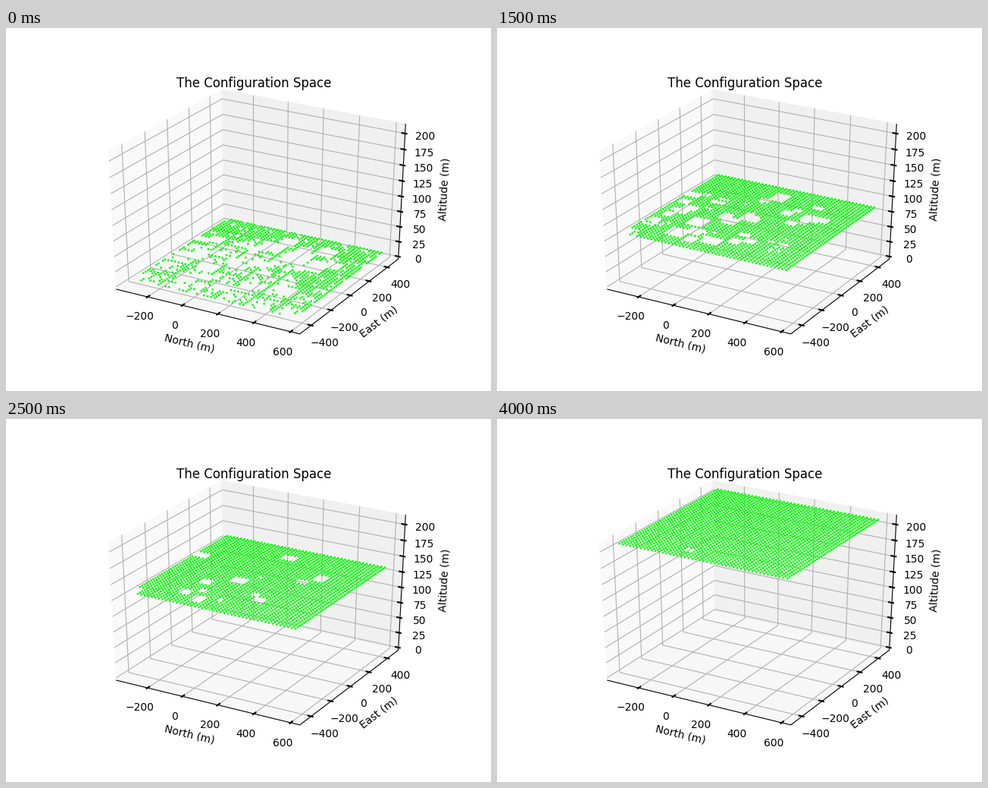
Write a matplotlib script that moves like this. It is 640 px wide and 478 px high and loops after 4.5 s.

```python
import numpy as np
import matplotlib.pyplot as plt
from matplotlib.animation import FuncAnimation

W, H = 640, 478
EDGE = 25 / 48              # half size of the drawn box
N_LIM, E_LIM, Z_LIM = (-361, 629), (-490, 500), (0, 210)
LABEL_PAD, TITLE_PAD = 0.0739, 0.1608

plt.rcParams["font.family"] = "DejaVu Sans"
fig = plt.figure(figsize=(W / 100, H / 100), dpi=100, facecolor="white")
ax = fig.add_axes([0, 0, 1, 1])
ax.set_xlim(0, W)
ax.set_ylim(H, 0)
ax.axis("off")


def project(x, y, z):
    """Box coordinates (-0.5..0.5) to stage pixels, elevation 30, azimuth -60."""
    c = np.sqrt(3) / 2
    u = c * x + 0.5 * y
    v = -0.25 * x + c / 2 * y + c * z
    depth = 10 - (c / 2 * x - 0.75 * y + 0.5 * z)
    sx, sy = 0.775 * W / 0.185, 0.77 * H / 0.185
    return (0.125 * W + sx * (0.095 + u / depth),
            0.89 * H - sy * (0.095 + v / depth))


def unit(value, lim):
    return (value - lim[0]) / (lim[1] - lim[0]) - 0.5


def path(points, color, zorder, lw=0.8):
    xs, ys = zip(*(project(*p) for p in points))
    ax.plot(xs, ys, color=color, lw=lw, zorder=zorder)


def pane(points, grey):
    ax.add_patch(plt.Polygon([project(*p) for p in points],
                             fc=str(grey), ec=str(grey), lw=1, zorder=1))


def tick(start, end, label_at, value):
    path([start, end], "k", 4, 1.5)
    x, y = project(*label_at)
    ax.text(x, y, str(value).replace("-", "\u2212"), fontsize=10,
            ha="center", va="top", zorder=6)


def axis_title(p, text, start, end):
    (x0, y0), (x1, y1) = project(*start), project(*end)
    angle = np.degrees(np.arctan2(y0 - y1, x1 - x0))
    x, y = project(*p)
    ax.text(x, y, text, fontsize=10, rotation=angle, rotation_mode="anchor",
            ha="center", va="center", zorder=6)


def draw_box():
    e = EDGE
    pane([(-e, -e, -e), (-e, e, -e), (-e, e, e), (-e, -e, e)], 0.975)
    pane([(-e, e, -e), (e, e, -e), (e, e, e), (-e, e, e)], 0.941)
    pane([(-e, -e, -e), (e, -e, -e), (e, e, -e), (-e, e, -e)], 0.967)

    grid = "#b0b0b0"
    inner, outer = e - 1 / 60, e + 1 / 120
    lab, tit = e + LABEL_PAD, e + TITLE_PAD
    for n in range(-200, 601, 200):
        t = unit(n, N_LIM)
        path([(t, -e, -e), (t, e, -e), (t, e, e)], grid, 2)
        tick((t, -inner, -e), (t, -outer, -e), (t, -lab, -lab), n)
    for m in range(-400, 401, 200):
        t = unit(m, E_LIM)
        path([(e, t, -e), (-e, t, -e), (-e, t, e)], grid, 2)
        tick((inner, t, -e), (outer, t, -e), (lab, t, -lab), m)
    for a in range(0, 201, 25):
        t = unit(a, Z_LIM)
        path([(e, e, t), (-e, e, t), (-e, -e, t)], grid, 2)
        tick((inner, e, t), (outer, e, t), (lab, lab, t), a)

    left, front = (-e, -e, -e), (e, -e, -e)
    right, top = (e, e, -e), (e, e, e)
    path([left, front, right, top], "k", 3)
    axis_title((0, -tit, -tit), "North (m)", left, front)
    axis_title((tit, 0, -tit), "East (m)", front, right)
    axis_title((tit, tit, 0), "Altitude (m)", right, top)
    ax.text(327.3, 78, "The Configuration Space", fontsize=12,
            ha="center", va="baseline", zorder=7)


north, east = np.meshgrid(np.arange(-316, 604, 20), np.arange(-445, 465, 20),
                          indexing="ij")

# landmarks: north, east, half width, height
LANDMARKS = [(114, 338, 44, 175), (381, 163, 44, 175), (58, -50, 45, 180),
             (268, -222, 36, 178), (8, -358, 35, 235), (-75, -145, 42, 185),
             (-285, 155, 38, 208), (248, 180, 75, 90)]


def random_towers(rng, count=28):
    """Mid-rise towers, taller and denser towards the south-west."""
    for _ in range(count):
        n = -300 + 780 * rng.random() ** 1.5
        m = rng.uniform(-330, 330)
        yield n, m, rng.uniform(26, 48), 85 + 85 * rng.random() ** 1.5


def city_heights():
    """Obstacle height over every grid point."""
    rng = np.random.default_rng(4)
    i, j = np.indices(north.shape)
    lots = 15 + rng.exponential(26, (12, 12))
    low = lots[i // 4, j // 4] * rng.uniform(0.5, 1.2, north.shape)
    green = (north + 0.7 * east > 330) | (east - north > 330)
    built = rng.random(north.shape) < np.where(green, 0.15, 0.72)
    street = (i % 8 == 7) | (j % 8 == 6)
    height = np.where(built & ~street, np.minimum(low, 105), 0)
    height[green] = np.minimum(height[green], 34)
    for n, m, half, top in [*LANDMARKS, *random_towers(rng)]:
        d = np.maximum(abs(north - n), abs(east - m)) / half
        height = np.maximum(height, np.where(d < 1, top * (1 - 0.4 * d**2), 0))
    height[:2, :4] = 171    # corner block
    return height


draw_box()
heights = city_heights()
dots = ax.scatter([], [], s=1, c="#00ff00", zorder=5)
dots.set_linewidths([1, 1])     # two widths keep the dots off the pixel grid


def update(k):
    alt = 10 + 25 * k
    free = heights < alt
    x, y = project(unit(north[free], N_LIM), unit(east[free], E_LIM),
                   unit(alt, Z_LIM))
    dots.set_offsets(np.column_stack([x, y]))
    return (dots,)


anim = FuncAnimation(fig, update, frames=9, interval=500, repeat=True,
                     repeat_delay=0, blit=False)
plt.show()
```
